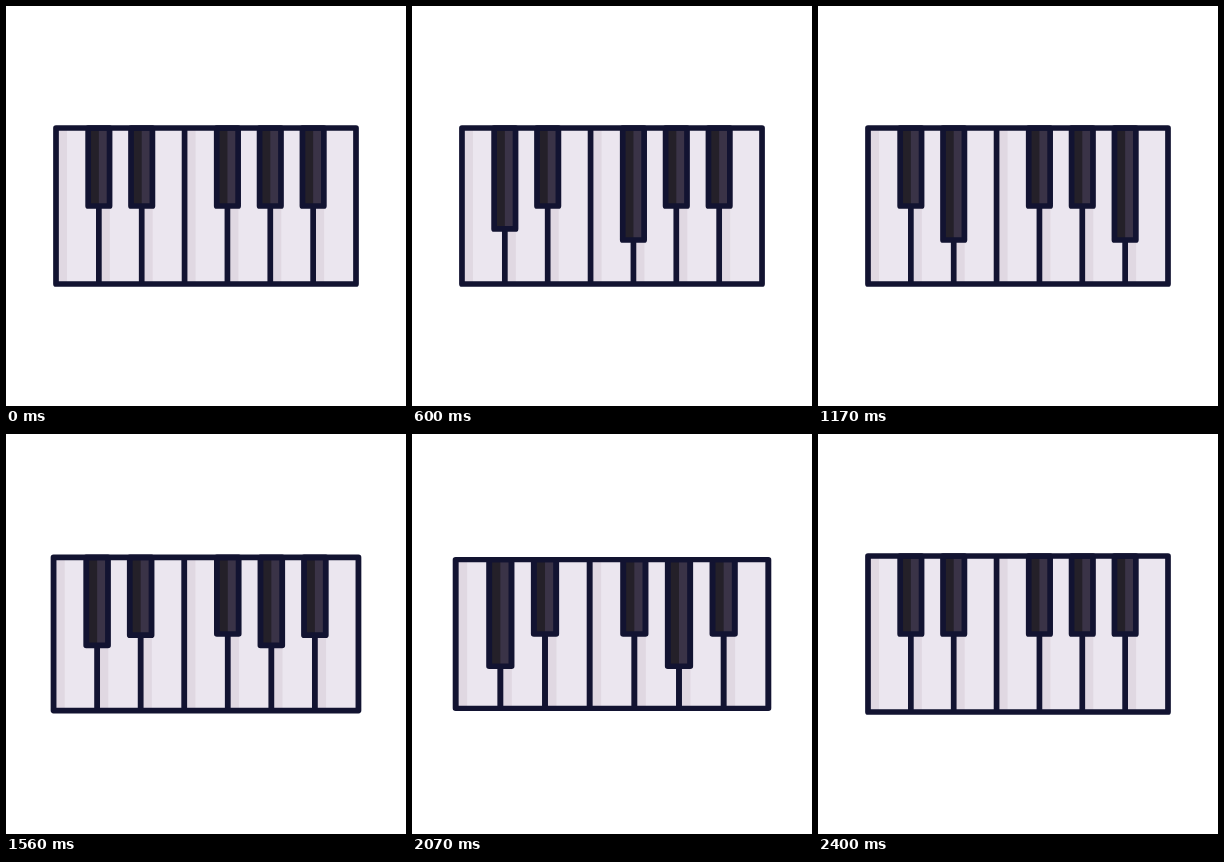
Recreate the animation shown at these times as an HTML page with a canvas. Size 400 px wide and 400 px high, loop 4430 ms.

```html
<!DOCTYPE html>
<html lang="en">
<head>
<meta charset="utf-8">
<title>Piano keys</title>
<style>
  html, body { margin: 0; width: 100%; height: 100%; overflow: hidden; background: #fff; }
  canvas { display: block; }
</style>
</head>
<body>
<canvas id="stage" width="400" height="400"></canvas>
<script>
const ctx = document.getElementById('stage').getContext('2d');
const LOOP = 4430;
const LEFT = 50, TOP = 122, WIDTH = 300, HEIGHT = 156;
const STEP = WIDTH / 7;
const KEY_WIDTH = 21.4, KEY_HEIGHT = 78, TRAVEL = 34;
const INK = '#121331';

// Each pulse: rise start, rise end, fall start, fall end (ms).
const squashes = [[100, 430, 430, 610], [610, 890, 890, 1170], [1310, 1900, 2000, 2400]];
const lastPress = [1322, 1900, 2060, 2400];
const thirdPress = [870, 1165, 1300, 1600];
const blackKeys = [
  { slot: 1, presses: [[0, 270, 480, 780], lastPress] },
  { slot: 2, presses: [thirdPress] },
  { slot: 4, presses: [[300, 590, 720, 1020]] },
  { slot: 5, presses: [lastPress] },
  { slot: 6, presses: [thirdPress] }
];

const ease = u => u < 0.5 ? 2 * u * u : 1 - 2 * (1 - u) ** 2;
const ramp = (t, a, b) => ease(Math.min(1, Math.max(0, (t - a) / (b - a))));
const level = (t, pulses) =>
  pulses.reduce((sum, [a, b, c, d]) => sum + ramp(t, a, b) - ramp(t, c, d), 0);

function fill(color, x, y, w, h) {
  ctx.fillStyle = color;
  ctx.fillRect(x, y, w, h);
}

function drawWhiteKeys() {
  fill('#ebe6ef', LEFT, TOP, WIDTH, HEIGHT);
  ctx.beginPath();
  for (let i = 0; i < 7; i++) {
    const x = LEFT + i * STEP;
    fill('#e0d8e2', x, TOP, 11, HEIGHT);
    if (i) {
      ctx.moveTo(x, TOP);
      ctx.lineTo(x, TOP + HEIGHT);
    }
  }
  ctx.stroke();
}

function drawBlackKey(slot, press) {
  const x = LEFT + slot * STEP - KEY_WIDTH / 2;
  const h = KEY_HEIGHT + press * TRAVEL;
  fill('#3a3347', x, TOP, KEY_WIDTH, h);
  fill('#242029', x, TOP, KEY_WIDTH / 2, h);
  ctx.strokeRect(x, TOP, KEY_WIDTH, h);
}

function draw(t) {
  const squash = level(t, squashes);
  fill('#fff', 0, 0, 400, 400);
  ctx.save();
  ctx.translate(200, 200);
  ctx.scale(1 + 0.045 * squash, 1 - 0.05 * squash);
  ctx.translate(-200, -200);
  ctx.strokeStyle = INK;
  ctx.lineWidth = 5.7;
  ctx.lineJoin = 'round';
  drawWhiteKeys();
  for (const { slot, presses } of blackKeys) drawBlackKey(slot, level(t, presses));
  ctx.strokeRect(LEFT, TOP, WIDTH, HEIGHT);
  ctx.restore();
}

const start = performance.now();
function tick() {
  draw((performance.now() - start) % LOOP);
  requestAnimationFrame(tick);
}
tick();
</script>
</body>
</html>
```
